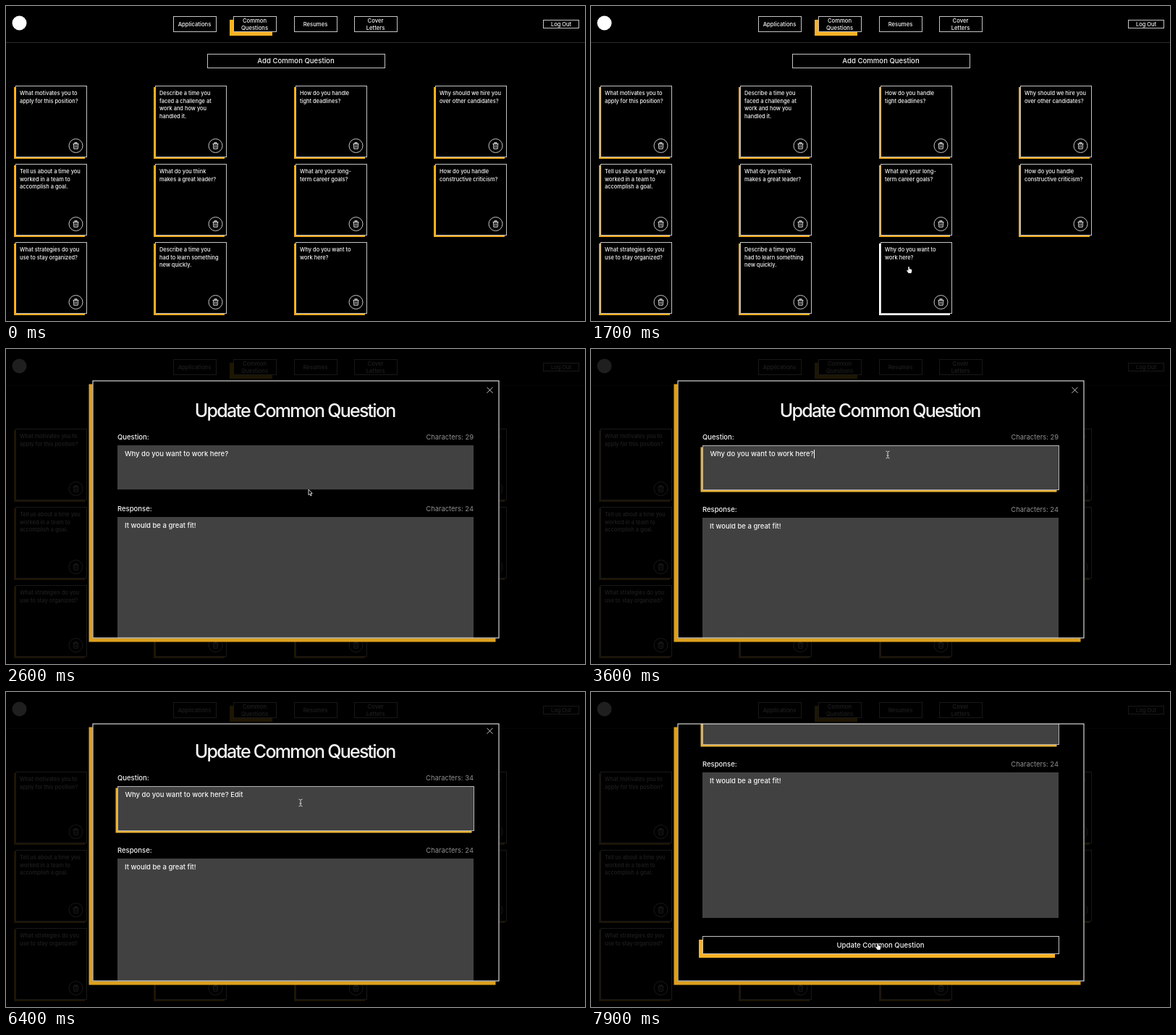
Animation of 800x435 px, one loop 8 s. Source, as an HTML page with a canvas:

```html
<!DOCTYPE html>
<html lang="en">
<head>
<meta charset="utf-8">
<title>Common questions</title>
<style>
  html, body { margin: 0; width: 100%; height: 100%; overflow: hidden; background: #000; }
  canvas { display: block; width: 800px; height: 435px; }
</style>
</head>
<body>
<canvas id="stage" width="800" height="435"></canvas>
<script>
const ctx = document.getElementById('stage').getContext('2d');
const LOOP = 8000, STEP = 100;
const OPEN = 1800, FOCUS = 3200, HIDE = 4500, SHOW = 5600;
const GOLD = '#fbb224', DEEP_GOLD = '#dda01d', LINE = '#c4c4c4', INK = '#f6f6f6', FIELD = '#414141';

const CARDS = [
  ['What motivates you to', 'apply for this position?'],
  ['Describe a time you', 'faced a challenge at', 'work and how you', 'handled it.'],
  ['How do you handle', 'tight deadlines?'],
  ['Why should we hire you', 'over other candidates?'],
  ['Tell us about a time you', 'worked in a team to', 'accomplish a goal.'],
  ['What do you think', 'makes a great leader?'],
  ['What are your long-', 'term career goals?'],
  ['How do you handle', 'constructive criticism?'],
  ['What strategies do you', 'use to stay organized?'],
  ['Describe a time you', 'had to learn something', 'new quickly.'],
  ['Why do you want to', 'work here?']
];

// time, x, y of the pointer hot spot
const PATH = [
  [700, 470, 434], [1300, 439, 360], [1900, 439, 360], [2600, 418, 194],
  [2700, 418, 194], [3100, 410, 146], [5600, 410, 146], [5900, 407, 153],
  [7000, 407, 153], [7800, 396, 347]
];
const SCROLL = [[6300, 0], [6400, 3], [6500, 62], [6600, 122]];
// time, characters typed so far
const KEYS = [[4500, 2], [4700, 3], [4800, 4], [4900, 5]];

const smooth = u => u * u * (3 - 2 * u);

function track(keys, t, col, ease = u => u) {
  if (t <= keys[0][0]) return keys[0][col];
  for (let i = 1; i < keys.length; i++) {
    const a = keys[i - 1], b = keys[i];
    if (t <= b[0]) return a[col] + (b[col] - a[col]) * ease((t - a[0]) / (b[0] - a[0]));
  }
  return keys[keys.length - 1][col];
}

function fill(x, y, w, h, color) {
  ctx.fillStyle = color;
  ctx.fillRect(x, y, w, h);
}

function box(x, y, w, h, { bg = '#000', line = LINE, shadow, off = 5 } = {}) {
  if (shadow) fill(x - off, y + off, w, h + 1, shadow);
  fill(x, y, w + 1, h + 1, bg);
  ctx.strokeStyle = line;
  ctx.lineWidth = 1;
  ctx.strokeRect(x + 0.5, y + 0.5, w, h);
}

function text(str, x, y, size, { align = 'left', color = INK, weight = 500, spacing = 0 } = {}) {
  ctx.font = `${weight} ${size}px Inter, "Open Sans", sans-serif`;
  ctx.letterSpacing = spacing + 'px';
  ctx.textAlign = align;
  ctx.fillStyle = color;
  ctx.fillText(str, x, y);
}

function lines(points, close) {
  ctx.beginPath();
  points.forEach(([x, y], i) => i ? ctx.lineTo(x, y) : ctx.moveTo(x, y));
  if (close) ctx.closePath();
}

function disc(x, y, r) {
  ctx.beginPath();
  ctx.arc(x, y, r, 0, Math.PI * 2);
}

function trash(x, y) {
  ctx.save();
  ctx.translate(x, y);
  ctx.strokeStyle = '#dcdcdc';
  ctx.lineWidth = 0.9;
  disc(0, 0, 9.5);
  ctx.stroke();
  ctx.lineWidth = 1;
  lines([[-4, -2.7], [4, -2.7]]);
  ctx.stroke();
  ctx.strokeRect(-1.4, -4.4, 2.8, 1.7);
  lines([[-3.1, -2.7], [-2.7, 4.2], [2.7, 4.2], [3.1, -2.7]]);
  ctx.stroke();
  ctx.lineWidth = 0.8;
  for (const dx of [-1, 1]) {
    lines([[dx, -1], [dx, 2.6]]);
    ctx.stroke();
  }
  ctx.restore();
}

function navButton(x, label, active) {
  box(x, 14, 59, 21, active ? { shadow: GOLD } : {});
  const top = label.length > 1 ? 22.8 : 27.8;
  label.forEach((s, i) => text(s, x + 29.5, top + i * 10.4, 7.7, { align: 'center' }));
}

function card(i, hovered) {
  const x = Math.round(13.2 + 193.2 * (i % 4));
  const y = 110 + 108 * Math.floor(i / 4);
  fill(x - 2, y + 2, 98, 99, hovered ? '#fff' : '#f0a91d');
  box(x, y, 98, 98);
  CARDS[i].forEach((s, n) => text(s, x + 6, y + 13.3 + n * 10.4, 7.45));
  trash(x + 83.5, y + 83);
}

function page(overCard) {
  fill(0, 0, 800, 435, '#000');
  fill(0, 50, 800, 1, '#2b2b2b');
  disc(18.5, 23.5, 10);
  ctx.fillStyle = '#fff';
  ctx.fill();
  navButton(231, ['Applications']);
  navButton(314, ['Common', 'Questions'], true);
  navButton(398, ['Resumes']);
  navButton(481, ['Cover', 'Letters']);
  box(742, 19, 49, 11);
  text('Log Out', 767, 27.8, 7.5, { align: 'center' });
  box(278, 66, 245, 19);
  text('Add Common Question', 400.5, 79.3, 9.6, { align: 'center' });
  CARDS.forEach((_, i) => card(i, overCard && i === 10));
}

function heading(label, count, y) {
  text(label, 154, y, 9.5);
  text('Characters: ' + count, 646, y, 9.4, { align: 'right', color: '#8f8f8f', weight: 400 });
}

function modal(t, overButton) {
  const focused = t >= FOCUS;
  const key = KEYS.filter(k => k[0] <= t).pop();
  const question = 'Why do you want to work here?' + ' Edit'.slice(0, key ? key[1] : 0);
  const response = 'It would be a great fit!';
  const grow = focused ? 1 : 0;

  fill(114.5, 48.5, 562, 356, DEEP_GOLD);
  fill(119.5, 43.5, 562, 356, '#000');

  ctx.save();
  ctx.beginPath();
  ctx.rect(120, 44, 561, 355);
  ctx.clip();
  ctx.translate(0, -Math.round(track(SCROLL, t, 1)));

  ctx.strokeStyle = '#ddd';
  ctx.lineWidth = 0.9;
  for (const s of [-4, 4]) {
    lines([[668.5 - s, 52.8], [668.5 + s, 60.8]]);
    ctx.stroke();
  }
  text('Update Common Question', 399.2, 94, 25, { align: 'center', spacing: -1.75 });

  heading('Question:', question.length, 125.3);
  if (focused) box(154, 133, 492, 61, { bg: FIELD, line: '#b4b4b4', shadow: '#e9b236', off: 2.5 });
  else fill(154, 133, 492, 61, FIELD);
  const left = 164 + grow * 0.5;
  text(question, left, 147.7 + grow * 0.5, 9.5);
  const since = key ? key[0] : FOCUS;
  if (focused && Math.floor((t - since) / 500) % 2 === 0) {
    fill(Math.round(left + ctx.measureText(question).width), 139, 1, 12, '#fff');
  }

  heading('Response:', response.length, 223.7 + grow);
  fill(154, 232 + grow, 492, 201, FIELD);
  text(response, 164, 246.7 + grow, 9.5);

  box(154, 458 + grow, 492, 24, { shadow: overButton && GOLD });
  text('Update Common Question', 400, 474 + grow, 9.6, { align: 'center' });
  ctx.restore();

  ctx.strokeStyle = '#fff';
  ctx.lineWidth = 1;
  ctx.strokeRect(120, 44, 561, 355);
}

function pointer(kind, x, y) {
  ctx.save();
  ctx.translate(x, y);
  ctx.lineJoin = 'round';
  if (kind === 'beam') {
    lines([[-2.5, -5], [-0.5, -4.2], [0, -3.5], [0, 3.5], [-0.5, 4.2], [-2.5, 5]]);
    ctx.moveTo(2.5, -5);
    ctx.lineTo(0, -3.8);
    ctx.moveTo(2.5, 5);
    ctx.lineTo(0, 3.8);
    ctx.moveTo(-1.5, 1);
    ctx.lineTo(1.5, 1);
    ctx.strokeStyle = '#d0d0d0';
    ctx.lineWidth = 1;
    ctx.stroke();
  } else if (kind === 'hand') {
    lines([[-0.7, 0], [0.7, 0], [1, 3], [4, 3.8], [4.4, 6], [3.4, 9], [-0.3, 9], [-2.8, 5.6], [-2.2, 4.6], [-0.7, 5.6]], true);
    ctx.strokeStyle = '#000';
    ctx.lineWidth = 1.4;
    ctx.stroke();
    ctx.fillStyle = '#f2f2f2';
    ctx.fill();
  } else {
    lines([[0, 0], [0, 7.6], [1.8, 6.1], [3, 8.8], [4.2, 8.3], [3, 5.6], [5.2, 5.4]], true);
    ctx.fillStyle = '#000';
    ctx.fill();
    ctx.strokeStyle = '#e6e6e6';
    ctx.lineWidth = 0.9;
    ctx.stroke();
  }
  ctx.restore();
}

function draw(t) {
  const x = track(PATH, t, 1, smooth), y = track(PATH, t, 2, smooth);
  const shown = (t >= 700 && t < HIDE) || t >= SHOW;
  const open = t >= OPEN;
  const within = (x0, y0, x1, y1) => shown && x >= x0 && x <= x1 && y >= y0 && y <= y1;
  const overCard = !open && within(400, 326, 498, 424);
  const overButton = t >= 6700 && within(154, 337, 646, 361);

  page(overCard);
  if (open) {
    fill(0, 0, 800, 435, 'rgba(0,0,0,0.88)');
    modal(t, overButton);
  }
  if (!shown) return;
  const scroll = track(SCROLL, t, 1);
  const overField = open && (within(154, 133 - scroll, 646, 193 - scroll) || within(154, 232 - scroll, 646, 433 - scroll));
  pointer(overCard || overButton ? 'hand' : overField ? 'beam' : 'arrow', x, y);
}

const start = performance.now();
function frame() {
  const t = (performance.now() - start) % LOOP;
  draw(Math.floor(t / STEP) * STEP);
  requestAnimationFrame(frame);
}
frame();
</script>
</body>
</html>
```
